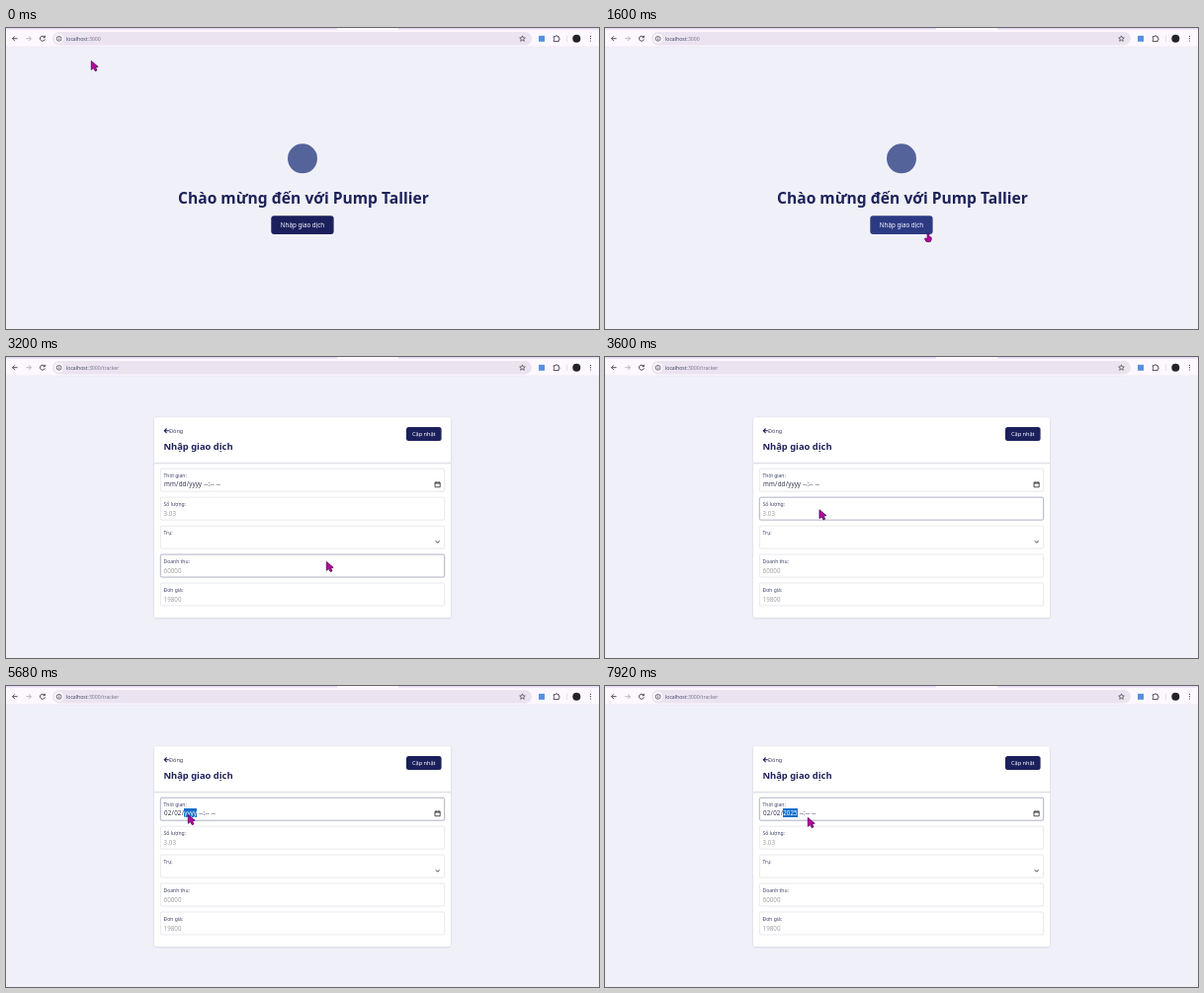
An HTML page for the animation above (8000 ms loop, 600 by 305 pixels).

```html
<!DOCTYPE html>
<html>
<head>
<meta charset="utf-8">
<style>
html, body { margin: 0; width: 100%; height: 100%; overflow: hidden; background: #f0f1f8; }
svg { position: absolute; left: 0; top: 0; }
text, #date { font-family: "Noto Sans", sans-serif; }
.navy { fill: #1d2159; }
.label { font-size: 5px; fill: #3f4268; }
.hint { font-size: 6.25px; fill: #a0a0a4; }
.url { font: 5.15px "Open Sans", sans-serif; fill: #73708a; }
.icon { fill: none; stroke: #3c3942; stroke-width: .9; }
.field { fill: #fff; stroke: #d9dae3; stroke-width: .6; }
.field.hover { stroke: #8d90ad; stroke-width: .7; }
#date { position: absolute; left: 159.8px; top: 124.4px; font-size: 6.25px; line-height: 9px; white-space: pre; color: #33364f; }
#date span { display: inline-block; padding: 0 .31px; }
#date .on { background: #1a6fcb; color: #fff; }
</style>
</head>
<body>
<svg width="600" height="305" viewBox="0 0 600 305">
  <defs>
    <filter id="shadow" x="-10%" y="-10%" width="120%" height="125%">
      <feDropShadow dx="0" dy=".6" stdDeviation="1" flood-color="#20244f" flood-opacity=".16"/>
    </filter>
  </defs>

  <g id="browser">
    <rect width="600" height="19" fill="#fdf8ff"/>
    <path d="M0 0H335V1.4H0ZM397 0H600V1.4H397Z" fill="#e6daf6"/>
    <path d="M0 19H600" stroke="#e9e5f1" stroke-width=".6"/>
    <rect x="47" y="4" width="485" height="13.4" rx="6.7" fill="#ebe4f0"/>
    <circle cx="53.6" cy="10.8" r="5" fill="#f8f3fb"/>
    <g class="icon">
      <path d="M11.6 10.7H6.6M8.9 8.3 6.5 10.7 8.9 13.1"/>
      <path d="M20.4 10.7H25.4M23.1 8.3 25.5 10.7 23.1 13.1" stroke="#b3aeb9"/>
      <path d="M39 9.2A2.5 2.5 0 1 0 39.4 11.4M39.4 7.8V9.7H37.5"/>
      <circle cx="53.6" cy="10.8" r="2.4" stroke-width=".7"/>
      <path d="M53.6 10.4V12.2M53.6 9.2V9.8" stroke-width=".7"/>
      <path d="M522.5 7.9 523.3 9.8 525.3 10 523.8 11.3 524.3 13.3 522.5 12.2 520.7 13.3 521.2 11.3 519.7 10 521.7 9.8Z" stroke-width=".7"/>
      <path d="M554.2 8.7H556A1 1 0 0 1 558 8.7H559.2V10.2A1 1 0 0 1 559.2 12.2V13.6H554.2V12.1A1 1 0 0 0 554.2 10.2Z"/>
      <path d="M567.5 7.5V14" stroke="#e4d9ee"/>
    </g>
    <rect x="539" y="7.8" width="6" height="6" fill="#5590df"/>
    <circle cx="577.3" cy="10.8" r="4" fill="#242329"/>
    <path d="M591.4 8.4v.01M591.4 10.7v.01M591.4 13v.01" stroke="#3c3942" stroke-width="1.2" stroke-linecap="round"/>
    <text x="61" y="12.7" class="url"><tspan fill="#34395f">localhost</tspan>:3000<tspan id="path"></tspan></text>
  </g>

  <g id="welcome">
    <circle cx="300" cy="132.3" r="15" fill="#54639a"/>
    <text x="174" y="178.2" class="navy" font-size="15.625" font-weight="700">Chào mừng đến với Pump Tallier</text>
    <rect id="enter" x="268.3" y="190.2" width="63.3" height="18.9" rx="3"/>
    <text x="300" y="201.8" font-size="6.25" fill="#fff" text-anchor="middle">Nhập giao dịch</text>
  </g>

  <g id="form">
    <rect x="150" y="61.3" width="300" height="202.7" rx="2.5" fill="#fff" filter="url(#shadow)"/>
    <path d="M150 107.3H450" stroke="#e0e1e8" stroke-width="1.2"/>
    <path d="M150 108.5H450" stroke="#f3f3f7"/>
    <path d="M164.8 74.8H160.6M162.6 72.5 160.3 74.8 162.6 77.1" fill="none" stroke="#1d2159" stroke-width="1.1"/>
    <text x="164.9" y="76.8" font-size="5.625" fill="#3f4268">Đóng</text>
    <text x="159.4" y="94.4" class="navy" font-size="9.375" font-weight="700">Nhập giao dịch</text>
    <rect x="405" y="70.9" width="35.6" height="14" rx="2.5" fill="#1b205c"/>
    <text x="422.8" y="79.9" font-size="5.625" fill="#fff" text-anchor="middle">Cập nhật</text>
    <g id="fields"></g>
    <path d="M434 127.2H439.2V131.8H434ZM434 128H439.2M435.2 126.2V127M438 126.2V127" fill="none" stroke="#222" stroke-width=".8"/>
    <path d="M434.8 186.3 436.7 188.2 438.6 186.3" fill="none" stroke="#222" stroke-width=".9"/>
  </g>
</svg>
<div id="date"></div>
<svg width="600" height="305" viewBox="0 0 600 305">
  <g id="cursor" stroke="#4b0a50" stroke-width=".8" stroke-linejoin="round" fill="#b8069f">
    <path id="arrow" d="M.3 .4V9.3L2.4 7.6 4.4 10.7 6 9.8 4.6 6.9 7.2 6.3Z"/>
    <path id="hand" d="M-.9 .6Q0-.5 .8 .6V3.3L3.2 4.2Q3.6 6.5 2.2 8.6H-1.8L-3.6 5.6-2.5 5-.9 6Z"/>
  </g>
</svg>
<script>
const LOOP = 8000, STEP = 80, FORM_AT = 2800;
const $ = id => document.getElementById(id);

// time, x, y of the pointer tip
const route = [
  [80, 86, 33], [720, 443, 141], [1520, 327, 208], [2640, 327, 208], [2720, 324, 207],
  [3200, 324, 207], [3840, 167, 130], [4400, 167, 130], [4560, 169, 130], [4800, 169, 130],
  [5360, 184, 130], [6160, 184, 130], [6640, 221, 139], [7040, 221, 139], [7440, 205, 133], [LOOP, 205, 133]
];

// time, month, day, year, selected part
const entries = [
  [0, "mm", "dd", "yyyy", -1],
  [4000, "mm", "dd", "yyyy", 0],
  [4400, "02", "dd", "yyyy", 1],
  [4960, "02", "02", "yyyy", 1],
  [5520, "02", "02", "yyyy", 2],
  [6880, "02", "02", "0002", 2],
  [7120, "02", "02", "0020", 2],
  [7360, "02", "02", "0202", 2],
  [7600, "02", "02", "2025", 2]
];

const fields = [["Thời gian:", ""], ["Số lượng:", "3.03"], ["Trụ:", ""], ["Doanh thu:", "60000"], ["Đơn giá:", "19800"]];
const fieldTop = i => 113.2 + i * 28.95, FIELD_H = 23;

$("fields").innerHTML = fields.map(([label, hint], i) => {
  const y = fieldTop(i);
  return `<rect class="field" x="156.3" y="${y}" width="287.4" height="${FIELD_H}" rx="1.6"/>
    <text class="label" x="159.6" y="${y + 8.7}">${label}</text>
    <text class="hint" x="159.6" y="${y + 18.7}">${hint}</text>`;
}).join("");
const boxes = document.querySelectorAll(".field");

function pointerAt(t) {
  const i = route.findIndex(p => p[0] >= t);
  if (i < 1) return route[0].slice(1);
  const [t0, x0, y0] = route[i - 1], [t1, x1, y1] = route[i];
  const u = (t - t0) / (t1 - t0), e = u * u * (3 - 2 * u);
  return [x0 + (x1 - x0) * e, y0 + (y1 - y0) * e];
}

function dateMarkup(t) {
  const [, mm, dd, yyyy, selected] = entries.findLast(e => e[0] <= t);
  const part = (text, i) => `<span class="${i === selected ? "on" : ""}">${text}</span>`;
  return `${part(mm, 0)}/${part(dd, 1)}/${part(yyyy, 2)} ${part("--")}:${part("--")} ${part("--")}`;
}

const show = (id, on) => $(id).style.display = on ? "" : "none";

function draw(now) {
  const t = Math.floor(now % LOOP / STEP) * STEP;
  const [x, y] = pointerAt(t);
  const onForm = t >= FORM_AT;
  const onButton = !onForm && x > 268 && x < 332 && y > 190 && y < 209;

  show("welcome", !onForm);
  show("form", onForm);
  show("date", onForm);
  show("arrow", !onButton);
  show("hand", onButton);
  $("path").textContent = onForm ? "/tracker" : "";
  $("enter").setAttribute("fill", onButton ? "#2c3a84" : "#1b205c");
  $("cursor").setAttribute("transform", `translate(${x} ${y})`);
  $("date").innerHTML = dateMarkup(t);
  boxes.forEach((box, i) => {
    const dy = y - fieldTop(i);
    box.classList.toggle("hover", x > 156 && x < 444 && dy > 0 && dy < FIELD_H);
  });
  requestAnimationFrame(draw);
}
requestAnimationFrame(draw);
</script>
</body>
</html>
```
